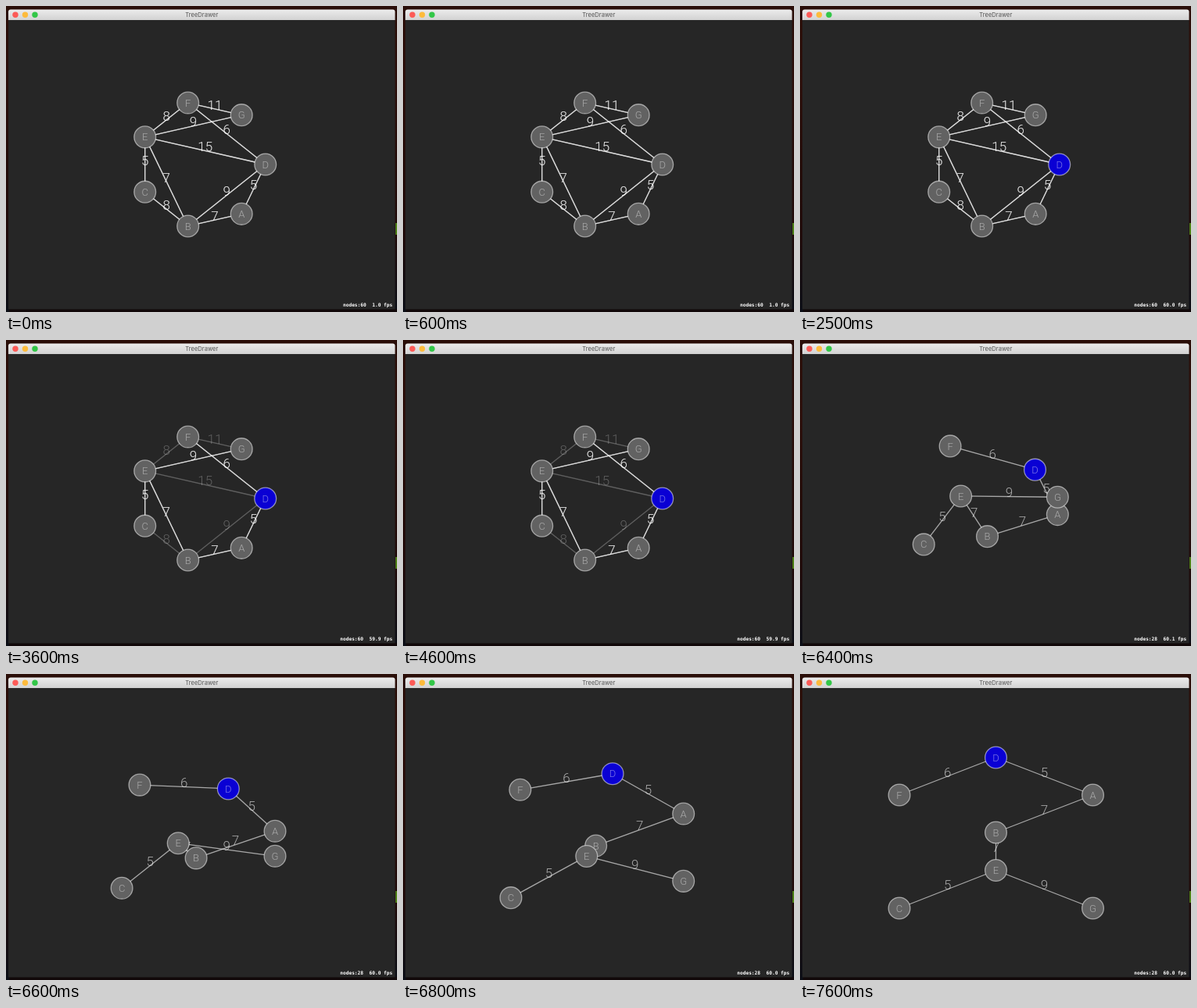
Write an HTML page with a canvas that moves like this. It is 500 px wide and 392 px high and loops after 8100 ms.

```html
<!DOCTYPE html>
<html lang="en">
<head>
<meta charset="utf-8">
<title>TreeDrawer</title>
<style>
  html, body { margin: 0; width: 100%; height: 100%; overflow: hidden; background: #1c0b08; }
  canvas { display: block; width: 500px; height: 392px; }
</style>
</head>
<body>
<canvas id="stage"></canvas>
<script>
const canvas = document.getElementById('stage');
const ctx = canvas.getContext('2d');
const W = 500, H = 392, LOOP = 8100, TICK = 100;
const scale = window.devicePixelRatio || 1;
canvas.width = W * scale;
canvas.height = H * scale;
ctx.scale(scale, scale);

// Where each node settles in the tree layout; the start layout is a circle.
const treeSpots = {
  A: [374.5, 155], B: [250.5, 203], C: [127, 300], D: [250.5, 107],
  E: [250.5, 251.5], F: [127, 155], G: [374.5, 300]
};
const ring = 'DABCEFG';
// Ends, weight, and whether the edge belongs to the spanning tree.
const edges = [
  ['EF', 8], ['FG', 11], ['ED', 15], ['CB', 8], ['DB', 9],
  ['EG', 9, true], ['FD', 6, true], ['EC', 5, true],
  ['EB', 7, true], ['DA', 5, true], ['BA', 7, true]
];
const EDGE_ALPHA = 0.6, DIM_ALPHA = 0.14;

const clamp = v => Math.min(1, Math.max(0, v));
const mix = (a, b, p) => a + (b - a) * p;
const white = alpha => `rgba(255,255,255,${alpha})`;

function text(str, x, y, font, color, align = 'center') {
  ctx.font = font;
  ctx.fillStyle = color;
  ctx.textAlign = align;
  ctx.fillText(str, x, y);
}

function disc(x, y, r, fill) {
  ctx.beginPath();
  ctx.arc(x, y, r, 0, 2 * Math.PI);
  ctx.fillStyle = fill;
  ctx.fill();
}

function verticalFade(y0, y1, ...colors) {
  const g = ctx.createLinearGradient(0, y0, 0, y1);
  colors.forEach((c, i) => g.addColorStop(i / (colors.length - 1), c));
  return g;
}

function drawWindow() {
  ctx.fillStyle = verticalFade(0, H, '#2a0e08', '#2c0f0b', '#240c09', '#200b0a', '#0b0e16');
  ctx.fillRect(0, 0, W, H);
  ctx.fillStyle = '#110809';
  ctx.fillRect(4, 388, W, 4);
  ctx.fillStyle = '#4d7f16';
  ctx.fillRect(498, 278, 2, 15);

  ctx.fillStyle = '#262626';
  ctx.fillRect(3, 17, 494.5, 371.5);
  ctx.fillStyle = verticalFade(4.5, 18, '#ececec', '#d2d2d2');
  ctx.beginPath();
  ctx.roundRect(3, 4.5, 494.5, 13.5, [3, 3, 0, 0]);
  ctx.fill();
  ['#fc5b57', '#fdbb3c', '#33c748'].forEach((c, i) => disc(12 + 12.5 * i, 11.3, 3.7, c));
  text('TreeDrawer', 250.3, 14, '7.6px Inter, sans-serif', '#555');
}

function layout(p) {
  const spots = {};
  [...ring].forEach((name, i) => {
    const angle = 2 * Math.PI * i / ring.length;
    const [x, y] = treeSpots[name];
    spots[name] = [
      mix(250.7 + 81 * Math.cos(angle), x, p),
      mix(203 + 81 * Math.sin(angle), y, p)
    ];
  });
  return spots;
}

function drawEdge([x1, y1], [x2, y2], weight, alpha) {
  if (alpha <= 0) return;
  ctx.strokeStyle = white(alpha);
  ctx.lineWidth = 1.3;
  ctx.beginPath();
  ctx.moveTo(x1, y1);
  ctx.lineTo(x2, y2);
  ctx.stroke();
  text(weight, (x1 + x2) / 2, (y1 + y2) / 2 + 0.7,
    '300 17px Roboto, sans-serif', white(alpha));
}

function drawNode(name, [x, y], selected) {
  disc(x, y, 13.9, selected ? '#0a00d4' : '#626262');
  ctx.strokeStyle = white(0.52);
  ctx.lineWidth = 1.3;
  ctx.stroke();
  text(name, x, y + 4.6, '300 13px Roboto, sans-serif', white(0.46));
}

function fpsAt(t) {
  if (t < 2500) return '1.0';
  if (t < 3600) return '60.0';
  if (t < 5500) return '59.9';
  return t < 6600 ? '60.1' : '60.0';
}

function draw(t) {
  const dim = clamp((t - 2500) / 400);
  const hide = clamp((t - 5480) / 400);
  const spots = layout(clamp((t - 6016) / 1000));
  const looseAlpha = mix(mix(EDGE_ALPHA, DIM_ALPHA, dim), 0, hide);
  const spareAlpha = mix(EDGE_ALPHA, 0, hide);

  drawWindow();
  // Every edge is stored in both directions, so it is painted twice.
  for (const [[from, to], weight, inTree] of edges) {
    const pair = inTree ? [EDGE_ALPHA, spareAlpha] : [looseAlpha, looseAlpha];
    for (const alpha of pair) drawEdge(spots[from], spots[to], weight, alpha);
  }
  for (const name of Object.keys(treeSpots)) {
    drawNode(name, spots[name], name === 'D' && t >= 2500);
  }
  const count = t < 5900 ? 60 : 28;
  text(`nodes:${count}\u00a0\u00a0${fpsAt(t)} fps`, 494.3, 385.2,
    'bold 6.2px "DejaVu Sans Mono", monospace', '#fff', 'right');
}

function frame() {
  const t = performance.now() % LOOP;
  draw(Math.floor(t / TICK) * TICK);
  requestAnimationFrame(frame);
}
frame();
</script>
</body>
</html>
```
